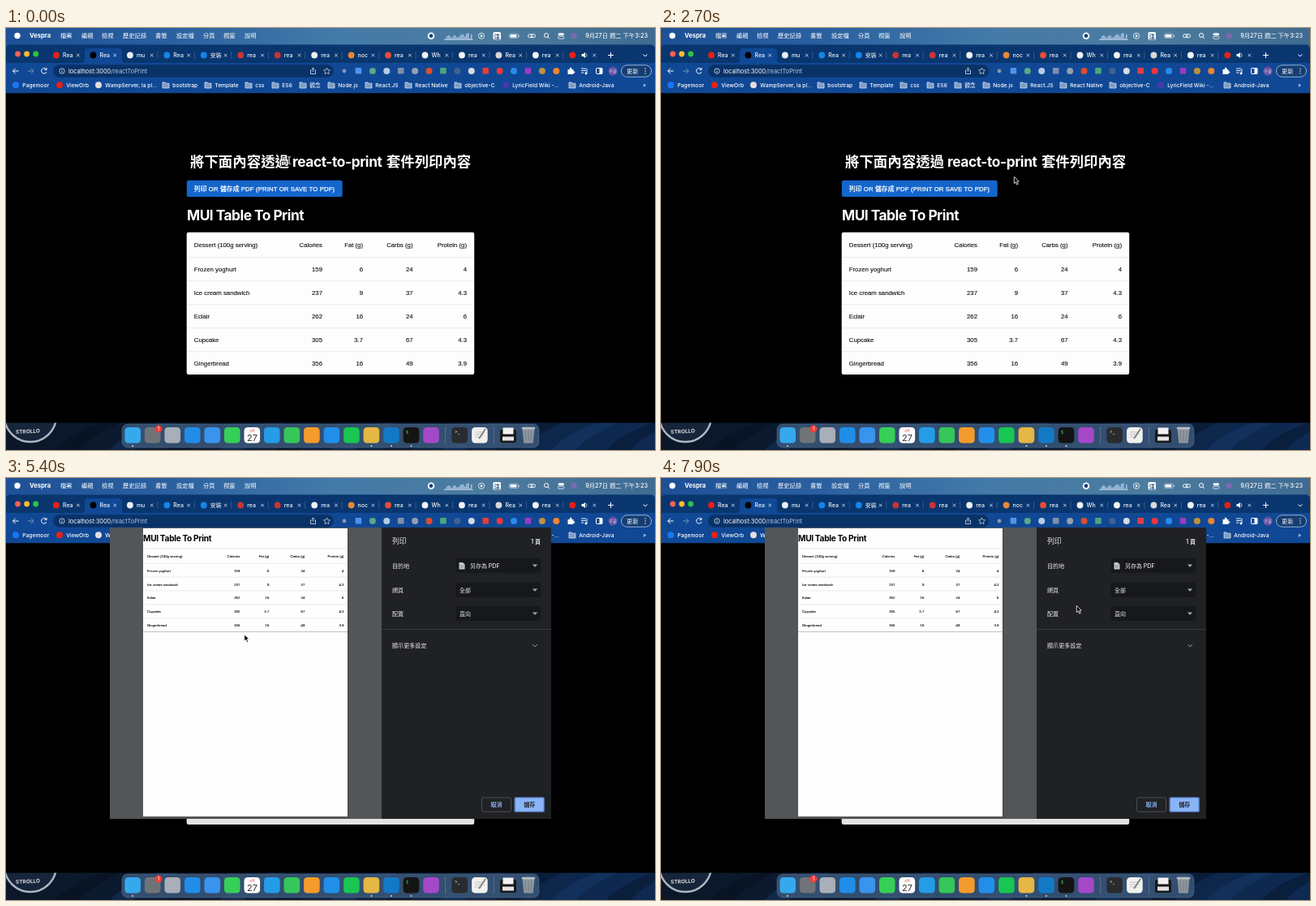
Animation of 800 by 520 pixels, one loop 8000 ms. Source, as an HTML page:

```html
<!DOCTYPE html>
<html lang="zh-Hant">
<head>
<meta charset="utf-8">
<title>Print dialog</title>
<style>
html, body { margin: 0; width: 100%; height: 100%; overflow: hidden; background: #000; }
svg { display: block; width: 100vw; height: 100vh; }
text { font-family: Inter, "Noto Sans CJK TC", "Noto Sans CJK", sans-serif; white-space: pre; }
.table text, .button text { font-family: "Liberation Sans", "Noto Sans CJK TC", "Noto Sans CJK", sans-serif; }
.table text { stroke: #111; stroke-width: .12px; }
.button text { letter-spacing: .12px; stroke: #fff; stroke-width: .25px; }
</style>
</head>
<body>
<svg id="stage" viewBox="0 0 800 520"></svg>
<script>
const text = (x, y, s, size, fill = '#fff', more = '') =>
  `<text x="${x}" y="${y}" font-size="${size}" fill="${fill}" ${more}>${s}</text>`;
const rect = (x, y, w, h, fill, r = 0, more = '') =>
  `<rect x="${x}" y="${y}" width="${w}" height="${h}" fill="${fill}" rx="${r}" ${more}/>`;
const dot = (x, y, r, fill, more = '') => `<circle cx="${x}" cy="${y}" r="${r}" fill="${fill}" ${more}/>`;
const line = (d, color = '#fff', w = 1, more = '') =>
  `<path d="${d}" fill="none" stroke="${color}" stroke-width="${w}" ${more}/>`;
const shape = (d, fill = '#fff', more = '') => `<path d="${d}" fill="${fill}" ${more}/>`;
const bold = 'font-weight="700"', semi = 'font-weight="600"', medium = 'font-weight="500"';
const right = 'text-anchor="end"', middle = 'text-anchor="middle"';

function menuBar() {
  const items = [[67, '檔案'], [93, '編輯'], [118, '檢視'], [144, '歷史記錄'], [184, '書籤'],
    [210, '設定檔'], [243, '分頁'], [268, '視窗'], [294, '說明']];
  let bars = '';
  for (let i = 0; i < 17; i++) {
    const h = 1 + 4 * Math.abs(Math.sin(i * 2.3)) + (i > 9 ? 2 * (i % 3) : 0);
    bars += rect(541 + i * 2, 14 - h, 1.5, h, '#a9c3e2');
  }
  return rect(0, 0, 800, 28, 'url(#menu)') + dot(14, 9.5, 3.7, '#fff') +
    text(29, 12.2, 'Vespra', 7.6, '#fff', bold) +
    items.map(([x, s]) => text(x, 12.2, s, 7.3, '#fff', medium)).join('') +
    dot(524, 9.7, 3.3, '#173f76', 'stroke="#fff" stroke-width="1.9"') +
    bars + line('M540 14.5H576', '#cfdeef', .7) +
    dot(586, 9.7, 3.6, 'none', 'stroke="#fff" stroke-width=".8"') + shape('M585 7.8L588 9.7L585 11.6Z') +
    rect(600.5, 5, 9.5, 9.5, '#fff', 1.5) + text(605.2, 12.5, '注', 7.3, '#1c4579', middle + ' ' + semi) +
    rect(620.5, 7, 11, 5.5, 'none', 1.5, 'stroke="#b9cbe0" stroke-width=".7"') + rect(621.5, 8, 8, 3.5, '#fff', .7) +
    rect(632.2, 8.7, 1, 2.2, '#b9cbe0') +
    rect(643.5, 7.7, 5.5, 4, 'none', 2, 'stroke="#fff" stroke-width=".9"') +
    rect(647, 7.7, 5.5, 4, 'none', 2, 'stroke="#fff" stroke-width=".9"') +
    dot(666, 9, 2.5, 'none', 'stroke="#fff"') + line('M668 11L670 13') +
    rect(680.5, 6.2, 7.5, 3, '#fff', 1.5) + rect(680.5, 10.3, 7.5, 3, 'none', 1.5, 'stroke="#fff" stroke-width=".7"') +
    dot(700, 9.7, 3.8, '#7a6ab0') + text(791, 12.3, '9月27日 週二 下午3:23', 7.3, '#fff', right + ' ' + medium);
}

function tabs() {
  const names = 'Rea Rea mu Rea 安裝 rea rea rea noc rea Wh rea Rea rea'.split(' ');
  const colors = '#e62117 #000 #e8eef5 #1585ea #1585ea #c93434 #c93434 #f1f1f1 #e88735 #e94c35 #f4f4f4 #f4f4f4 #d8d8d8 #f4f4f4 #e62117'.split(' ');
  let s = rect(0, 20.6, 800, 30, '#09366f', 5) + shape('M94 43Q97 43 97 39V29Q97 25 101 25H139Q143 25 143 29V39Q143 43 146 43Z', '#104895');
  ['#ff5f57', '#febc2e', '#28c840'].forEach((c, i) => s += dot(14.5 + i * 11.1, 32, 3.4, c));
  colors.forEach((c, i) => {
    const x = 62 + 45.45 * i;
    s += dot(x, 33.5, 3.9, c);
    if (i < 14) {
      s += text(x + 8, 36.1, names[i], 7, '#f2f6fc', medium) +
        line(`M${x + 25} 31.8l3.6 3.6m0 -3.6l-3.6 3.6`, '#e8f0fa', .8);
      if (i > 1) s += line(`M${x + 34} 29v9`, '#4d75a5', .6);
    }
  });
  return s + shape('M709.5 32h2l2.5-2v7l-2.5-2h-2Z') + line('M715 31q2 2.5 0 5', '#fff', .7) +
    line('M723.5 31.8l3.6 3.6m0 -3.6l-3.6 3.6', '#e8f0fa', .8) + line('M742 33.5h7m-3.5 -3.5v7') +
    line('M785.5 32.5l2.5 2.5l2.5 -2.5');
}

function toolbar() {
  const tools = '#8997aa #4e93ed #59a887 #b5cbe6 #7f8faa #929fb0 #df4d30 #49a77b #416291 #d5dbe1 #e83d3d #ed3841 #2b8bec #9c3bc0 #bb923f #ed8432'.split(' ');
  let s = rect(0, 43, 800, 37.5, '#104895') +
    line('M15.5 53H8.5m3.2 -3.3l-3.3 3.3l3.3 3.3', '#fff') +
    line('M27 53h7m-3.2 -3.3l3.3 3.3l-3.3 3.3', '#6f94c4') +
    line('M49.4 50.6A3.3 3.3 0 1 0 50 54M50 49v2.5h-2.6') +
    rect(58, 45.2, 346, 15.6, '#093267', 7.8) + dot(69, 53, 3.2, 'none', 'stroke="#d9e5f5" stroke-width=".8"') +
    line('M69 52.5v2.2m0 -3.8v.7', '#fff', .8) +
    text(77, 55.7, 'localhost:3000<tspan fill="#b2c5df">/reactToPrint</tspan>', 7.4, '#fff') +
    line('M377 52h-1.5v4.5h6V52h-1.5M378.5 54v-5m-1.6 1.6l1.6 -1.6l1.6 1.6', '#d6e2f1', .8) +
    shape('M395.5 49l1.2 2.6 2.8.3-2 1.9.5 2.9-2.5-1.5-2.5 1.5.5-2.9-2-1.9 2.8-.3Z', 'none', 'stroke="#d6e2f1" stroke-width=".7"');
  tools.forEach((c, i) => {
    const x = 417 + i * 17.42;
    s += i % 3 == 1 ? rect(x - 3.8, 49, 7.6, 7.6, c, 1) : dot(x, 53, i ? 4 : 2.4, c);
  });
  return s + shape('M692.5 51h2.3q-.4-2.5 1.3-2.5t1.3 2.5h2v2.2q2 0 2 1.2t-2 1.2v1.4h-6.9Z') +
    line('M709 50h6m-6 2.5h6m-6 2.5h3.5M716 50v5.5', '#fff', .9) + dot(715, 56, 1.4, '#fff') +
    rect(727.5, 49.5, 7.5, 7, 'none', .8, 'stroke="#fff"') + rect(731.5, 49.5, 3.5, 7, '#fff') +
    dot(748, 53, 5.6, '#6653a0') + text(748, 55.3, '子安', 4.8, '#d8d0ed', middle) +
    rect(758.5, 45.8, 37, 14.4, '#153d72', 7.2, 'stroke="#b9cde7" stroke-width=".8"') +
    text(765, 55.6, '更新', 7.2, '#fff', medium) + [50, 53, 56].map(y => dot(788, y, .7, '#fff')).join('');
}

function bookmarks() {
  const marks = [[12, 'Pagemoor', '#1877f2'], [66, 'ViewOrb', '#e62117'], [114, 'WampServer, la pl…', '#e5dce0'],
    [197, 'bootstrap'], [249, 'Template'], [299, 'css'], [332, 'ES6'], [366, '觀念'], [401, 'Node.js'],
    [447, 'React.JS'], [496, 'React Native'], [557, 'objective-C'], [616, 'LyricField Wiki -…', '#4936ad'], [698, 'Android-Java']];
  return marks.map(([x, s, c]) => (c ? dot(x, 70.3, 4, c)
    : shape(`M${x - 4} 67h3l1 1.2h4v5.8h-8Z`, '#7f9cc4', 'stroke="#d4e1f0" stroke-width=".8"')) +
    text(x + 8.3, 72.7, s, 6.7, '#fff', medium)).join('') + text(785, 72.5, '»', 7);
}

const rows = [['Dessert (100g serving)', 'Calories', 'Fat (g)', 'Carbs (g)', 'Protein (g)'],
  ['Frozen yoghurt', 159, 6, 24, 4], ['Ice cream sandwich', 237, 9, 37, 4.3],
  ['Eclair', 262, 16, 24, 6], ['Cupcake', 305, 3.7, 67, 4.3], ['Gingerbread', 356, 16, 49, 3.9]];

const table = (cols, yOf, size) => `<g class="table">${rows.map((row, r) => row.map((s, c) =>
  text(cols[c], yOf(r), s, size, '#111', c ? right : '')).join('')).join('')}</g>`;

function page() {
  let s = rect(0, 80.5, 800, 406, '#000') +
    text(227, 171.2, '將下面內容透過', 17.45, '#fff', bold) +
    text(353, 171, 'react-to-print', 17.3, '#fff', bold + ' letter-spacing="-.4"') +
    text(469, 171.2, '套件列印內容', 17.35, '#fff', bold) +
    '<g class="button">' + rect(222.8, 187.8, 191.9, 20.3, '#1466cc', 2.2, 'id="button"') +
    text(231.8, 200.8, '列印 OR 儲存成 PDF (PRINT OR SAVE TO PDF)', 7.75) + '</g>' +
    text(223, 236.7, 'MUI Table To Print', 17.4, '#fff', bold + ' letter-spacing="-.55"') +
    rect(222.7, 251.7, 354.5, 175.3, '#fdfdfd', 2.3);
  for (let i = 0; i < 5; i++) s += line(`M223 ${282.7 + i * 29}H577`, '#dedede', .6);
  return s + table([231.8, 390, 440, 501.5, 568], r => r ? 271 + r * 28.9 : 270.2, 7.75);
}

function wallpaper() {
  let s = rect(0, 486, 800, 34, 'url(#desk)');
  for (let i = 0; i < 12; i++) {
    const x = 60 + i * 68;
    s += shape(`M${x} 520Q${x + 22} 497 ${x + 60} 486H${x + 82}Q${x + 42} 505 ${x + 30} 520Z`,
      i % 2 ? '#1b4478' : '#050c18', 'opacity=".35"');
  }
  return s;
}

function dock() {
  const colors = '#35a9ed #707378 #a8afb9 #208de8 #3894ed #36cf58 #fff #249ce6 #35c759 #f39b2c #218fe9 #18c651 #e5b744 #1479c5 #141414 #a448c8 #292b2e #f1f1ef'.split(' ');
  let s = wallpaper() +
    dot(30, 478, 32, '#17253b', 'stroke="#aeb7bf" stroke-width="2.5" clip-path="url(#low)"') +
    text(27, 499.3, 'STROLLO', 6.5, '#d5d9dc', `${bold} ${middle} transform="rotate(-3 27 498)"`) +
    rect(143, 488, 514, 29, '#3a5879', 7, 'fill-opacity=".85" stroke="#58728f" stroke-width=".5"');
  colors.forEach((c, i) => s += rect((i < 16 ? 146.4 + i * 24.52 : 549.4 + (i - 16) * 24.7), 492, 19.6, 19.6, c, 4.5));
  s += text(303.5, 497.5, '9月', 4, '#e5483e', middle) + text(303.5, 508.7, '27', 11, '#333', middle) +
    dot(188, 494, 4.4, '#fb3b36') + text(188, 496.4, '1', 6.5, '#fff', middle) +
    text(493, 499.5, '$', 5, '#41d959') + text(553, 500, '&gt;_', 5.5) +
    line('M578 498h12m-12 3h12m-12 3h9', '#aaa', .7) + line('M583 506l8 -12', '#777', 1.5) +
    line('M541.5 491v22M601.5 491v22', '#6d849d', .6) +
    rect(609, 495, 20, 16, '#17191b', 2) + rect(612.5, 492.5, 13, 8, '#f2f2f2') + rect(612, 503.5, 14, 5, '#e4e4e4') +
    shape('M636.5 493.5h15l-1.8 18h-11.4Z', '#8e979e') + rect(635.7, 491.8, 16.6, 2.6, '#b5bdc2', 1.3) +
    line('M640 496l1 13m3 -13v13m4 -13l-1 13', '#68747d', .7);
  return s + [156, 450.5, 475, 499.5].map(x => dot(x, 515, .9, '#e5edf5')).join('');
}

function preview() {
  let s = rect(169, 62, 252.2, 355.5, '#fefefe') + line('M421.6 62V417.8H169', '#303235', .8) +
    text(169, 78.4, 'MUI Table To Print', 10.2, '#000', bold + ' letter-spacing="-.34"');
  for (let i = 0; i < 7; i++) s += line(`M169 ${i ? 88.3 + i * 16.87 : 87}H421`, i == 6 ? '#999' : '#dedede', .6);
  return s + table([174, 288.3, 324.3, 368.3, 416.5], r => r ? 98.8 + r * 16.85 : 98.1, 4.3);
}

function dialog() {
  const label = (y, s) => text(476, y + 2.7, s, 7.1, '#e8eaed', medium);
  const select = (y, x, s) => rect(554.5, y - 9, 104.5, 18, '#17181a', 2) + text(x, y + 2.6, s, 7, '#e8eaed', medium) +
    shape(`M648.8 ${y - 1.5}h6.4l-3.2 3.2Z`, '#a4a8ad');
  return rect(128, 61, 335, 359, '#525659') + rect(463, 61, 209, 359, '#202124') +
    text(476, 81.3, '列印', 8.8, '#e8eaed', medium) + text(659, 80.8, '1 頁', 7, '#e8eaed', right + ' ' + semi) +
    label(108, '目的地') + label(138, '網頁') + label(167, '配置') + label(206.5, '顯示更多設定') +
    select(108, 572, '另存為 PDF') + select(138, 559, '全部') + select(167, 559, '直向') +
    shape('M558.5 104h4.5l2.5 2.5v6h-7Z', '#c3c6ca') + line('M560 108h4m-4 2h4', '#555', .5) +
    line('M463 186.5H672', '#3c4043', .8) + line('M649.5 205.2l2.7 2.7l2.7 -2.7', '#a4a8ad') +
    rect(586.5, 393.8, 36, 17.4, '#202124', 2, 'stroke="#5f6368" stroke-width=".7"') +
    text(604.5, 405.1, '取消', 7, '#8ab4f8', middle + ' ' + semi) +
    rect(627, 393.6, 36.4, 17.8, '#8ab4f8', 2, 'stroke="#476ca8" stroke-width="1.4"') +
    text(645.2, 405.1, '儲存', 7, '#202124', middle + ' ' + semi) +
    rect(223, 420, 354, 7, '#000', 0, 'opacity=".1"');
}

const gradient = (id, ...colors) => `<linearGradient id="${id}">${colors.map((c, i) =>
  `<stop offset="${i / (colors.length - 1)}" stop-color="${c}"/>`).join('')}</linearGradient>`;
const beam = 'M-2 -4.5Q0 -4.5 0 -3V3Q0 4.5 2 4.5M2 -4.5Q0 -4.5 0 -3M0 3Q0 4.5 -2 4.5';
const stage = document.getElementById('stage');
stage.innerHTML = `<defs>${gradient('menu', '#1d5096', '#2a60a0', '#437aa8', '#4d7c9f', '#3f6b92')}
  ${gradient('desk', '#0b1728', '#0c1f3c', '#0e2a52')}
  <clipPath id="low"><path d="M0 486H800V520H0Z"/></clipPath></defs>` +
  menuBar() + tabs() + toolbar() + bookmarks() + dock() + page() +
  `<path id="sheet" fill="#222"/><g id="dialog">${dialog()}</g><g id="preview">${preview()}</g>
  <g id="cursor">
    <g>${line(beam, '#444', 1.9)}${line(beam, '#ccc', .9)}</g>
    ${shape('M-1.7 -4.7V3.5L.2 1.8L1.7 5L3.2 4.3L1.7 1.2H4.2Z', '#000', 'stroke="#fff" stroke-width=".8"')}
    ${shape('M-1.8 -4.5Q-.3 -5 -.2 -3.5V-1.3Q3.8 -1 3.8 .6Q3.8 3 2.6 4.5H-1.8Q-2.4 3 -4 1.2Q-3.8 -.1 -2 .8V-3.8Z', '#fff', 'stroke="#111" stroke-width=".7"')}
  </g>`;

const [button, sheet, dialogBox, previewBox, cursor] =
  ['button', 'sheet', 'dialog', 'preview', 'cursor'].map(id => document.getElementById(id));
const show = (node, on) => node.setAttribute('visibility', on ? 'visible' : 'hidden');
// Time, x, y of the pointer
const path = [[0, 349, 163], [300, 349, 163], [1700, 499, 157], [2700, 437, 188],
  [3500, 296, 198], [4600, 296, 198], [4800, 295.5, 197.5], [6000, 295.5, 197.5], [7400, 514, 162], [8000, 514, 162]];

function pointer(t) {
  const i = path.findIndex(p => p[0] > t);
  const a = path[i - 1], b = path[i];
  const u = (t - a[0]) / (b[0] - a[0]), e = u * u * (3 - 2 * u);
  return [a[1] + (b[1] - a[1]) * e, a[2] + (b[2] - a[2]) * e];
}

function draw(now) {
  const t = now % 8000, [x, y] = pointer(t);
  const p = Math.min(1, Math.max(0, (t - 4800) / 215));
  const inset = 128 + 20 * (1 - p), bottom = 408 + 12 * p;
  sheet.setAttribute('d', `M${inset} 61H${800 - inset}L672 ${bottom}H128Z`);
  sheet.setAttribute('opacity', p);
  show(dialogBox, t >= 5100);
  show(previewBox, t >= 5400);
  const free = t < 4800;
  const overButton = free && x > 223 && x < 414.5 && y > 188 && y < 208;
  const overTitle = free && x > 227 && x < 573 && y > 153 && y < 177;
  button.setAttribute('fill', overButton ? '#1153b2' : '#1466cc');
  const kind = overTitle ? 0 : overButton ? 2 : 1;
  [...cursor.children].forEach((node, i) => show(node, i === kind));
  cursor.setAttribute('transform', `translate(${x} ${y})`);
  requestAnimationFrame(draw);
}
requestAnimationFrame(draw);
</script>
</body>
</html>
```
